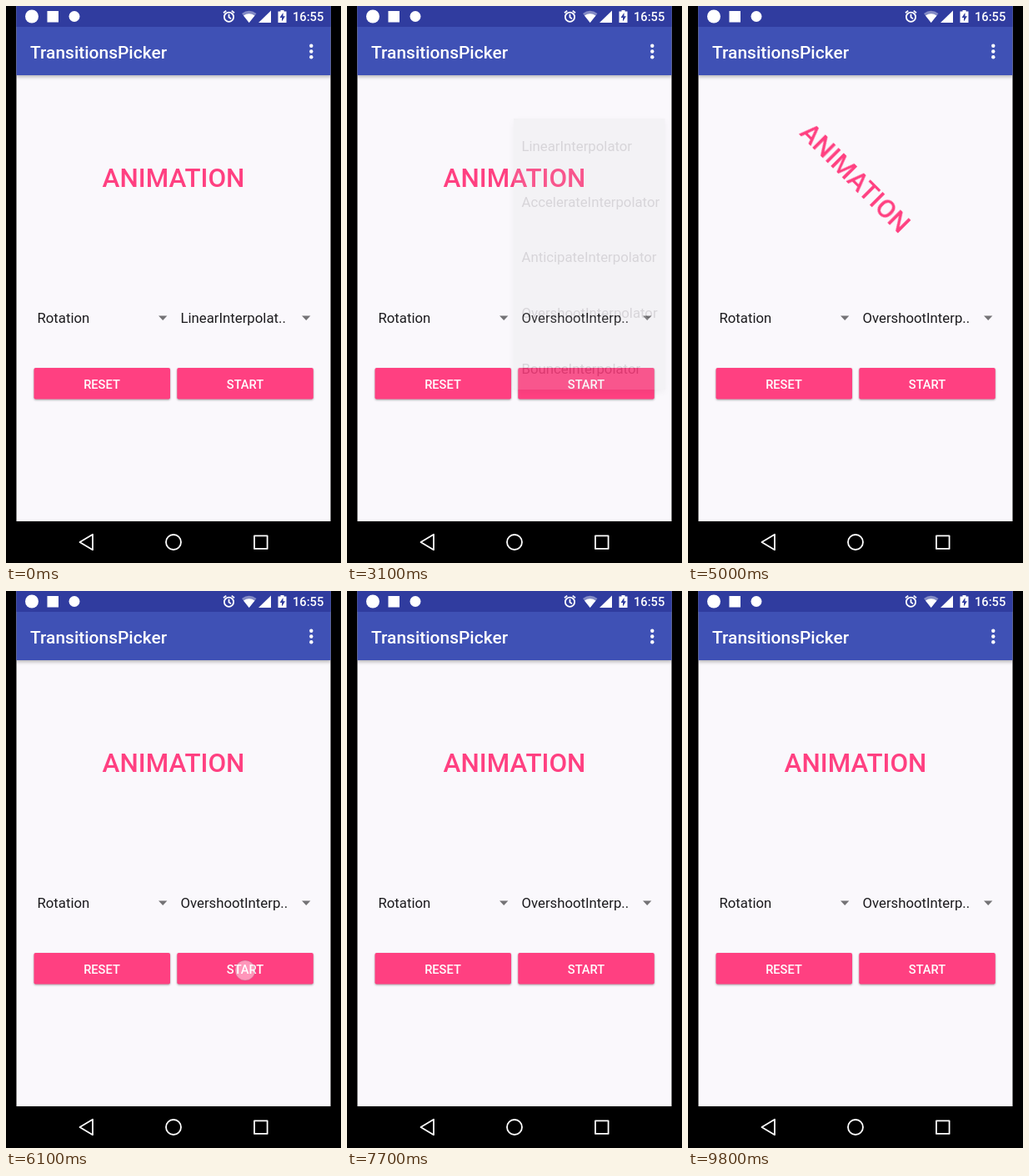
Animation, 402 px wide and 668 px high, one loop 9900 ms. Source, as an HTML page:

```html
<!DOCTYPE html>
<html lang="en">
<head>
<meta charset="utf-8">
<title>Rotation demo</title>
<style>
  html, body { margin: 0; width: 100%; height: 100%; overflow: hidden; background: #000; }
  svg { display: block; width: 402px; height: 668px; }
  text { font: 400 16.75px Roboto, sans-serif; fill: #1c1b1e; }
  .title { font-size: 20.94px; font-weight: 500; fill: #fff; }
  .clock { font-size: 14.66px; font-weight: 500; fill: #fff; }
  .label { font-size: 14.66px; font-weight: 500; fill: #fff; text-anchor: middle; }
  .word { font-size: 31.4px; font-weight: 500; fill: #ff4081; text-anchor: middle; }
  .button { fill: #ff4081; filter: drop-shadow(0 1px 1px rgba(0, 0, 0, .35)); }
  .bar { filter: drop-shadow(0 2px 2px rgba(0, 0, 0, .28)); }
  .panel { fill: #fafafa; filter: drop-shadow(0 3px 4px rgba(0, 0, 0, .35)); }
  .line { fill: none; stroke: #fff; stroke-width: 1.8; stroke-linejoin: round; }

  /* One loop is 9.9 s, so 1% is 99 ms. */
  #spin, #menu, #shade, #before, #after, #touch { animation: 9.9s linear infinite; }
  #spin { transform-origin: 201px 206px; animation-name: spin; }
  #menu { animation-name: menu; }
  #shade { animation-name: shade; }
  #before { animation-name: before; animation-timing-function: step-end; }
  #after { animation-name: after; animation-timing-function: step-end; }
  #touch { animation-name: touch; animation-timing-function: step-end; }

  /* The cubic curve is an overshoot with tension 0.5. */
  @keyframes spin {
    0% { transform: rotate(0deg); }
    41.41%, 62.63%, 84.217% {
      transform: rotate(0deg);
      animation-timing-function: cubic-bezier(.3333, 1.1667, .6667, 1);
    }
    43.94%, 65.15%, 86.74% { transform: rotate(405deg); }
    55.55%, 75.75%, 92.92% { transform: rotate(405deg); }
    55.56%, 75.76%, 92.93% { transform: rotate(0deg); }
    100% { transform: rotate(0deg); }
  }
  @keyframes menu {
    0%, 16.16% { opacity: 0; }
    18.69%, 29.8% { opacity: 1; }
    31.31% { opacity: .13; }
    33.33%, 100% { opacity: 0; }
  }
  @keyframes shade {
    0%, 16.16% { opacity: 0; }
    18.69%, 31.31% { opacity: .025; }
    33.33%, 100% { opacity: 0; }
  }
  @keyframes before { 0% { opacity: 1; } 29.29%, 100% { opacity: 0; } }
  @keyframes after { 0% { opacity: 0; } 29.29%, 100% { opacity: 1; } }
  @keyframes touch {
    0% { opacity: 0; }
    15.15% { opacity: 1; transform: translate(296px, 378px); }
    16.16% { opacity: 0; }
    28.28% { opacity: 1; transform: translate(290px, 371px); }
    29.29% { opacity: 0; }
    40.4%, 61.61%, 83.2% { opacity: 1; transform: translate(287px, 455px); }
    41.41%, 62.63%, 84.2% { opacity: 0; }
    54.54%, 74.74%, 91.91% { opacity: 1; transform: translate(115px, 455px); }
    55.56%, 75.76%, 92.93% { opacity: 0; }
    100% { opacity: 0; }
  }
</style>
</head>
<body>
<svg viewBox="0 0 402 668">
  <rect width="402" height="668"/>
  <rect x="12.5" width="377" height="618" fill="#faf8fc"/>
  <svg x="12.5" width="377" height="618" viewBox="12.5 0 377 618">
    <rect class="bar" x="12" y="0" width="378" height="83" fill="#3f51b5"/>
    <rect x="12" width="378" height="25" fill="#303c9f"/>
  </svg>

  <!-- Status bar -->
  <g fill="#fff">
    <circle cx="31" cy="12.5" r="8"/>
    <rect x="49.5" y="6" width="13.5" height="13.5"/>
    <circle cx="82" cy="12.5" r="6.5"/>
    <path d="M283 9Q291.5 2.5 300.5 9L291.7 20Z" opacity=".4"/>
    <path d="M285 11.5Q291.7 7 298.5 11.5L291.7 20Z"/>
    <path d="M303 20L318 5.5V20Z"/>
    <path d="M329.5 5h4v1.5h3V20h-10V6.5h3Z"/>
  </g>
  <path d="M332.5 8L328.5 14H331V18.5L335 12.3H332.5Z" fill="#303c9f"/>
  <g class="line" stroke-width="1.6">
    <circle cx="267.5" cy="13.2" r="5.6"/>
    <path d="M267.5 9.8V13.6L270 15.2M261 8.2L264.2 5.6M274 8.2L270.8 5.6"/>
  </g>
  <text class="clock" x="344" y="18">16:55</text>

  <!-- App bar -->
  <text class="title" x="29" y="62.5">TransitionsPicker</text>
  <g fill="#fff">
    <circle cx="366.3" cy="47.8" r="2.2"/>
    <circle cx="366.3" cy="54.5" r="2.2"/>
    <circle cx="366.3" cy="61.2" r="2.2"/>
  </g>

  <g id="spin"><text class="word" x="201" y="217">ANIMATION</text></g>

  <!-- Selectors -->
  <text x="37.5" y="380">Rotation</text>
  <text id="before" x="209.5" y="380">LinearInterpolat..</text>
  <text id="after" x="209.5" y="380">OvershootInterp..</text>
  <path d="M183 371.5h10.4l-5.2 5.4ZM355 371.5h10.4l-5.2 5.4Z" fill="#747376"/>

  <!-- Buttons -->
  <rect class="button" x="33.5" y="434" width="163.5" height="37.5" rx="2"/>
  <rect class="button" x="205.3" y="434" width="163.5" height="37.5" rx="2"/>
  <text class="label" x="115" y="458.7">RESET</text>
  <text class="label" x="287" y="458.7">START</text>

  <!-- Drop-down list -->
  <rect id="shade" x="200" y="135" width="181.5" height="325"/>
  <g id="menu">
    <rect class="panel" x="200" y="135" width="181.5" height="325" rx="2"/>
    <text x="209.5" y="173.5">LinearInterpolator</text>
    <text x="209.5" y="240.5">AccelerateInterpolator</text>
    <text x="209.5" y="307.3">AnticipateInterpolator</text>
    <text x="209.5" y="374.2">OvershootInterpolator</text>
    <text x="209.5" y="441">BounceInterpolator</text>
  </g>

  <g id="touch">
    <circle r="12" fill="#fff" fill-opacity=".45" stroke="#77757a" stroke-opacity=".28"/>
  </g>

  <!-- Navigation bar -->
  <g class="line">
    <path d="M88.5 643L104 633.8V652.2Z"/>
    <circle cx="201" cy="643" r="9"/>
    <rect x="298" y="635.3" width="15.6" height="15.6"/>
  </g>
</svg>
</body>
</html>
```
